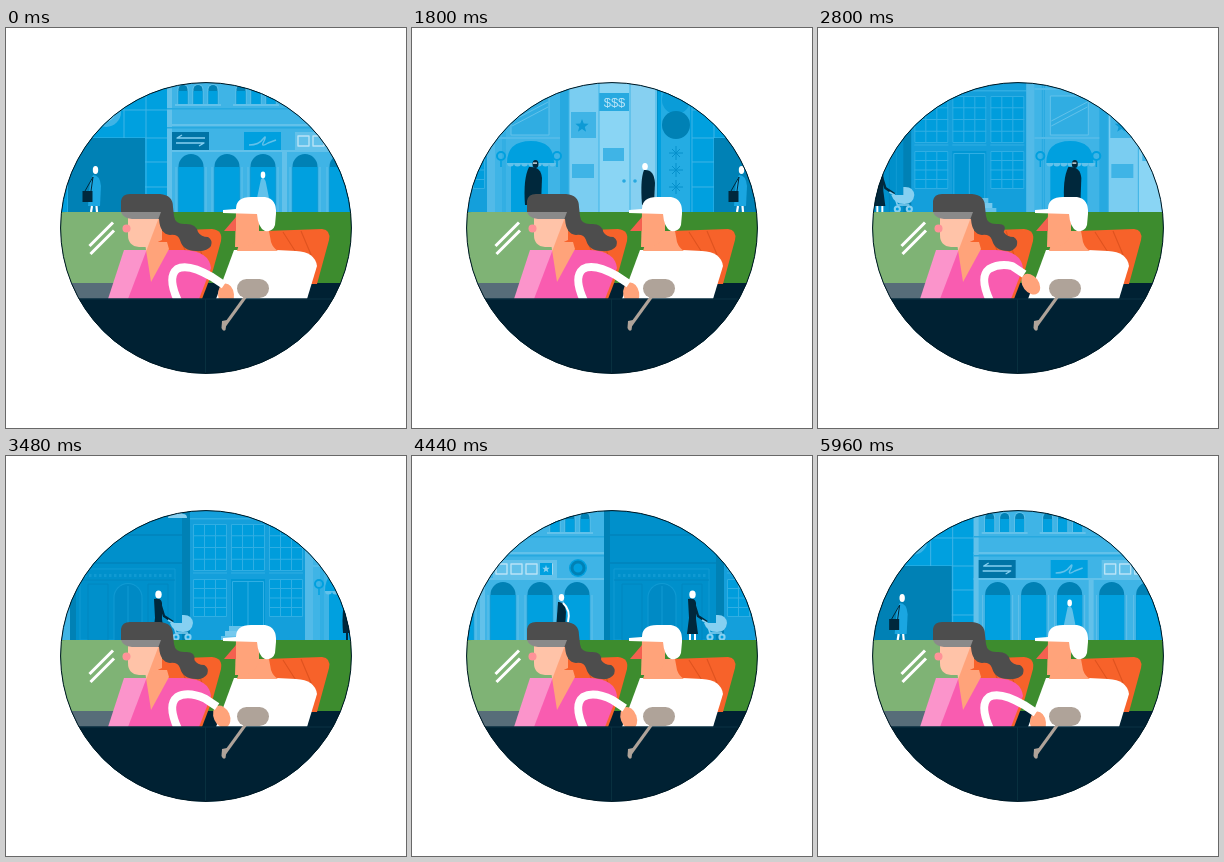
An HTML page with a canvas for the animation above (6 s loop, 400x400 px).

```html
<!DOCTYPE html>
<html lang="en">
<head>
<meta charset="utf-8">
<title>Street drive</title>
<style>
html, body { margin: 0; width: 100%; height: 100%; overflow: hidden; background: #fff; }
canvas { display: block; width: 400px; height: 400px; }
</style>
</head>
<body>
<canvas id="stage"></canvas>
<script>
const LOOP = 6000, STEP = 40, STREET = 800, SWAY = 2000;
const ratio = Math.max(1, window.devicePixelRatio || 1);
const canvas = document.getElementById('stage');
canvas.width = canvas.height = 400 * ratio;
const c = canvas.getContext('2d');

const BLUE = '#00a0df', DEEP = '#0081b5', DARK = '#0074a6', MID = '#3fb4e6';
const SOFT = '#62c1ea', PALE = '#86d0f1', NIGHT = '#002133', INK = '#00283c';
const SKIN = '#ffa37a', PINK = '#f95cb0', ORANGE = '#f7622a', HAIR = '#4d4d4d';

function rect(x, y, w, h, color) {
  c.fillStyle = color;
  c.fillRect(x, y, w, h);
}
function frame(x, y, w, h, color, width = 1) {
  c.strokeStyle = color;
  c.lineWidth = width;
  c.strokeRect(x, y, w, h);
}
function oval(x, y, rx, ry, color, turn = 0) {
  c.fillStyle = color;
  c.beginPath();
  c.ellipse(x, y, rx, ry, turn, 0, Math.PI * 2);
  c.fill();
}
function disc(x, y, r, color) { oval(x, y, r, r, color); }
function ring(x, y, r, color, width = 1) {
  c.strokeStyle = color;
  c.lineWidth = width;
  c.beginPath();
  c.arc(x, y, r, 0, Math.PI * 2);
  c.stroke();
}
function shape(d, color) {
  c.fillStyle = color;
  c.fill(new Path2D(d));
}
function line(d, color, width = 1, cap = 'butt') {
  c.strokeStyle = color;
  c.lineWidth = width;
  c.lineCap = cap;
  c.lineJoin = 'round';
  c.stroke(new Path2D(d));
}
function arch(x, y, w, bottom, color) {
  const r = w / 2;
  c.fillStyle = color;
  c.beginPath();
  c.arc(x, y + r, r, Math.PI, 0);
  c.lineTo(x + r, bottom);
  c.lineTo(x - r, bottom);
  c.fill();
}
function star(x, y, r, color) {
  c.fillStyle = color;
  c.beginPath();
  for (let i = 0; i < 10; i++) {
    const a = -Math.PI / 2 + i * Math.PI / 5, k = i % 2 ? r * 0.42 : r;
    c.lineTo(x + k * Math.cos(a), y + k * Math.sin(a));
  }
  c.fill();
}

function tiledHall() {
  rect(5, 50, 157, 134, BLUE);
  rect(9, 50, 29, 134, '#24ace3');
  for (const x of [40, 62, 82, 118, 140]) line(`M${x} 50V184`, MID);
  for (const y of [58, 82, 110, 134, 159]) line(`M40 ${y}H162`, MID);
  rect(62, 110, 77, 74, DEEP);
  disc(24, 72, 14, '#0a9cd8');
  disc(24, 97, 14, DEEP);
  for (const y of [125, 142, 159]) {
    line(`M17 ${y}H31M24 ${y - 7}V${y + 7}M20 ${y - 4}L28 ${y + 4}M28 ${y - 4}L20 ${y + 4}`, '#0590cb');
  }
  disc(100, 84, 15, MID);
  ring(100, 84, 9, PALE);
  ring(100, 84, 4, PALE);
  line('M5 50V184', DEEP);
}

function arcade() {
  rect(161, 50, 239, 134, MID);
  rect(161, 50, 5, 134, SOFT);
  for (const mid of [192, 250, 308, 366]) {
    for (const x of [mid - 15, mid, mid + 15]) {
      arch(x, 56, 11, 76, SOFT);
      arch(x, 57, 9, 76, DEEP);
      rect(x - 4.5, 63, 9, 13, BLUE);
    }
    rect(mid - 23, 76, 46, 2, SOFT);
  }
  rect(161, 80, 239, 1.5, '#27a9e0');
  rect(161, 96, 239, 2, SOFT);
  rect(161, 99, 239, 1.5, '#27a9e0');
  rect(161, 122, 239, 2, SOFT);
  for (const x of [185, 221, 257, 299, 336, 373]) {
    arch(x, 126, 25, 184, DEEP);
    rect(x - 12.5, 139, 25, 45, BLUE);
    line(`M${x - 15} 139V184M${x + 15} 139V184`, SOFT);
  }
  rect(276, 124, 5, 60, SOFT);
  rect(166, 104, 37, 18, DARK);
  line('M199 110H171L176 107M170 115H198L193 118', PALE, 1.3);
  rect(238, 104, 37, 18, BLUE);
  line('M243 117Q253 117 257 111Q261 106 258 113Q254 120 262 115L270 112', SOFT, 1.4);
  rect(289, 104, 64, 18, SOFT);
  for (let i = 0; i < 4; i++) frame(292 + i * 15, 108, 11, 10, '#b9e4f7', 1.4);
  rect(336, 107, 12, 12, BLUE);
  star(342, 113, 4, PALE);
  disc(374, 112, 9, BLUE);
  ring(374, 112, 6, DEEP, 3);
}

function darkHouse() {
  const edge = '#109ad3', shade = '#0086bf';
  rect(-400, 50, 121, 134, '#0090cb');
  rect(-400, 50, 6, 134, DEEP);
  rect(-394, 78, 108, 2, shade);
  rect(-394, 106, 108, 2, shade);
  frame(-390, 113, 95, 71, edge);
  for (let x = -386; x < -297; x += 5) rect(x, 118, 2.5, 3, edge);
  line('M-390 124H-295', shade);
  for (const x of [-382, -322]) frame(x, 128, 20, 56, shade);
  arch(-342, 127, 29, 184, edge);
  arch(-342, 128, 27, 184, '#008ac5');
  line('M-342 130V184', edge);
  rect(-288, 50, 8, 134, DEEP);
}

function gridHouse() {
  const bar = '#30aee3';
  rect(-280, 50, 116, 134, '#149fdb');
  rect(-280, 62, 116, 1.5, bar);
  for (let col = 0; col < 3; col++) {
    const x = -277 + col * 38;
    for (const y of [68, 123]) {
      if (col === 1 && y === 123) continue;
      const h = y === 68 ? 47 : 38;
      rect(x, y, 34, h, '#009ddc');
      frame(x + .5, y + .5, 33, h - 1, bar);
      line(`M${x + 11.5} ${y}v${h}M${x + 22.5} ${y}v${h}`, bar);
      for (let r = 1; r < 4; r++) line(`M${x} ${y + h * r / 4}h34`, bar);
    }
    line(`M${x} 117H${x + 34}`, bar);
  }
  rect(-239, 123, 34, 61, '#0097d4');
  frame(-237.5, 125.5, 31, 58, bar);
  line('M-222 126V184', bar);
  rect(-241, 170, 38, 5, SOFT);
  rect(-245, 175, 46, 5, '#75c9ee');
  rect(-249, 180, 54, 4, SOFT);
  shape('M-302 62Q-302 58 -296 58Q-292 53 -287 58Q-283 58 -283 62Z', PALE);
}

function awningShop() {
  rect(-165, 50, 82, 134, MID);
  rect(-165, 50, 8, 134, '#52bae8');
  line('M-149 50V184M-147 50V184', '#27a9e0');
  rect(-92, 50, 9, 134, '#27a9e0');
  rect(-157, 60, 65, 2, '#52bae8');
  rect(-141, 68, 38, 39, '#30ade2');
  frame(-141, 68, 38, 39, SOFT);
  line('M-140 93L-104 74M-140 98L-104 79', SOFT);
  rect(-157, 109, 65, 2, '#52bae8');
  rect(-141, 134, 37, 50, BLUE);
  shape('M-145 135Q-145 113 -121 113Q-98 113 -98 135Z', BLUE);
  for (let x = -141.5; x < -98; x += 7) {
    c.fillStyle = SOFT;
    c.beginPath();
    c.arc(x, 135, 3.5, 0, Math.PI);
    c.fill();
  }
  for (const x of [-151, -95]) {
    ring(x, 128, 4, BLUE, 2);
    line(`M${x} 133V139`, BLUE, 1.5);
  }
}

function paleHouses() {
  rect(-83, 50, 30, 134, '#7acdf1');
  rect(-53, 50, 31, 134, '#8ad5f4');
  rect(-22, 50, 27, 134, PALE);
  rect(-81, 84, 25, 26, MID);
  star(-70, 98, 7, '#0d9ad5');
  rect(-80, 136, 22, 14, MID);
  rect(-53, 65, 30, 18, '#27a9e0');
  c.font = '500 13px "Liberation Sans", Arial, sans-serif';
  c.textAlign = 'center';
  c.fillStyle = '#b9e4f7';
  c.fillText('$$$', -37.5, 79);
  rect(-49, 120, 21, 13, MID);
  line('M-83 50V184M-53 50V184M-22 50V184M4 50V184', MID);
  disc(-28, 153, 1.8, '#27a9e0');
  disc(-17, 153, 1.8, '#27a9e0');
}

function people() {
  // Shopper with a bag
  shape('M87 147Q94 147 95 158L94 178H82L84 154Z', '#1aa6e1');
  oval(89.5, 142, 2.7, 4, '#fff');
  line('M87 149L79 163M87 149L85 163', INK);
  rect(76.5, 163, 10, 11, INK);
  line('M86 178L85 184M90.5 178L91 184', '#fff', 2.2);

  shape('M-8 142Q2 141 3 155L2 177H-10Q-12 152 -8 142Z', INK);
  oval(-7, 138.5, 2.8, 3.6, '#fff');
  line('M-6 177V184M-1 177V184', '#fff', 1.8);

  shape('M-123 139Q-111 138 -110 150L-111 177H-127Q-129 151 -123 139Z', INK);
  oval(-116.5, 136, 3, 4, INK);
  rect(-119, 134.5, 4, 1.2, '#fff');
  line('M-123 176V184M-115 176V184', INK, 2);

  shape('M255 151Q259 149 260 155L263 170H251Z', SOFT);
  oval(257, 147, 2.3, 3.4, '#fff');
  line('M255 170V182M259 170V182', PALE, 2);

  shape('M354 146Q361 145 362 156L361 174H352Z', INK);
  oval(357.5, 141.5, 2.7, 3.4, '#fff');
  line('M359 147Q367 154 364 166', '#fff', 2);
  line('M355 174V184M360 174V184', INK, 2);

  // Parent and pram
  shape('M-316 143Q-309 141 -308 147L-308 163L-306 178H-317L-315 162Z', INK);
  oval(-311.5, 138.5, 3.2, 4, '#fff');
  line('M-310 147L-306 160L-297 166', INK, 2.5);
  line('M-314 178V184M-309 178V184', '#fff', 2);
  line('M-302 164L-297 167L-294 177L-282 177', PALE, 1.5);
  shape('M-300 167H-277Q-278 176 -287 176Q-297 176 -300 167Z', PALE);
  shape('M-288 167V159Q-278 158 -277 167Z', PALE);
  for (const x of [-294, -282]) {
    disc(x, 181, 3.6, PALE);
    disc(x, 181, 1.5, BLUE);
  }
}

function street() {
  tiledHall();
  arcade();
  darkHouse();
  gridHouse();
  awningShop();
  paleHouses();
  people();
}

function seats() {
  shape('M150 203L206 201Q217 202 215 213L207 242L196 271H160Z', ORANGE);
  line('M172 204L186 240M188 203L199 236', '#e0531f', 1.2);
  shape('M260 203L316 201Q325 202 323 212L311 256H268Z', ORANGE);
  line('M277 204L291 226M295 203L306 229', '#e0531f', 1.2);
}

function driver() {
  shape('M228 222H270L290 223Q309 224 311 238L301 271H210Z', '#fff');
  shape('M237 203H263L265 214Q267 220 272 223H231Z', SKIN);
  shape('M230 184H253V207Q248 218 238 219H229Z', SKIN);
  shape('M230 189L218 203H230Z', '#f4604f');
  shape('M217 182L230 181Q230 169 245 169H259Q271 171 270 186L269 197Q267 204 259 203Q252 200 251 186L217 185Z', '#fff');
}

function passenger(sway) {
  const tip = 206 - 7 * sway;
  shape('M118 222H178Q203 223 205 240L193 271H102Z', PINK);
  shape('M139 214H161L163 221L145 254L140 222Z', SKIN);
  shape('M122 184H156V212L141 219H133Q122 218 122 207Z', SKIN);
  disc(120.5, 200.5, 4, '#ff5a62');
  shape(`M115 184V173Q116 166 124 166H154Q167 167 167 179L168 188
    Q169 196 178 196Q190 195 ${tip - 14} 204Q${tip - 11} 209 ${tip - 4} 209
    Q${tip + 1} 212 ${tip - 1} 218Q${tip - 5} 224 190 223Q177 223 174 212
    Q172 206 164 207Q154 206 153 191H126Q117 190 115 184Z`, HAIR);
}

function windscreen() {
  shape('M40 186L60 184H155L122 271H40Z', 'rgba(255,255,255,.34)');
  line('M83.5 218L107 194.5M84.5 226L108 202.5', '#fff', 3);
}

function arm(sway) {
  const x = 218 - 13 * sway, y = 257 - 12 * sway;
  oval(220 - 8 * sway, 267 - 12 * sway, 8, 11.5, SKIN, -0.1 - 0.6 * sway);
  line(`M172 273Q161 249 171 241Q182 235 ${x - 12} ${y - 8}L${x} ${y}`, '#fff', 8);
}

function door() {
  rect(40, 270.5, 320, 90, NIGHT);
  line('M55 271H345', '#0a3344');
  line('M199.5 271V346', '#08303f');
  line('M240 268L219 297', '#afa399', 3);
  shape('M216 293L221 292L219.5 302Q217 304 215.5 300Z', '#afa399');
  c.fillStyle = '#afa399';
  c.beginPath();
  c.roundRect(231, 251, 32, 19, 9.5);
  c.fill();
}

function draw(t) {
  c.setTransform(ratio, 0, 0, ratio, 0, 0);
  rect(0, 0, 400, 400, '#fff');
  c.save();
  c.beginPath();
  c.arc(200, 200, 145.5, 0, Math.PI * 2);
  c.clip();
  rect(50, 50, 300, 300, BLUE);
  const shift = t / LOOP * STREET;
  for (const x of [shift, shift - STREET]) {
    c.save();
    c.translate(x, 0);
    street();
    c.restore();
  }
  rect(50, 184, 300, 71, '#3d8c2e');
  rect(50, 255, 300, 20, NIGHT);
  const sway = (1 - Math.cos(t / SWAY * Math.PI * 2)) / 2;
  seats();
  driver();
  passenger(sway);
  windscreen();
  arm(sway);
  door();
  c.restore();
  ring(200, 200, 145.4, '#00151f');
}

const start = performance.now();
function tick() {
  const t = (performance.now() - start) % LOOP;
  draw(Math.floor(t / STEP) * STEP);
  requestAnimationFrame(tick);
}
tick();
</script>
</body>
</html>
```
